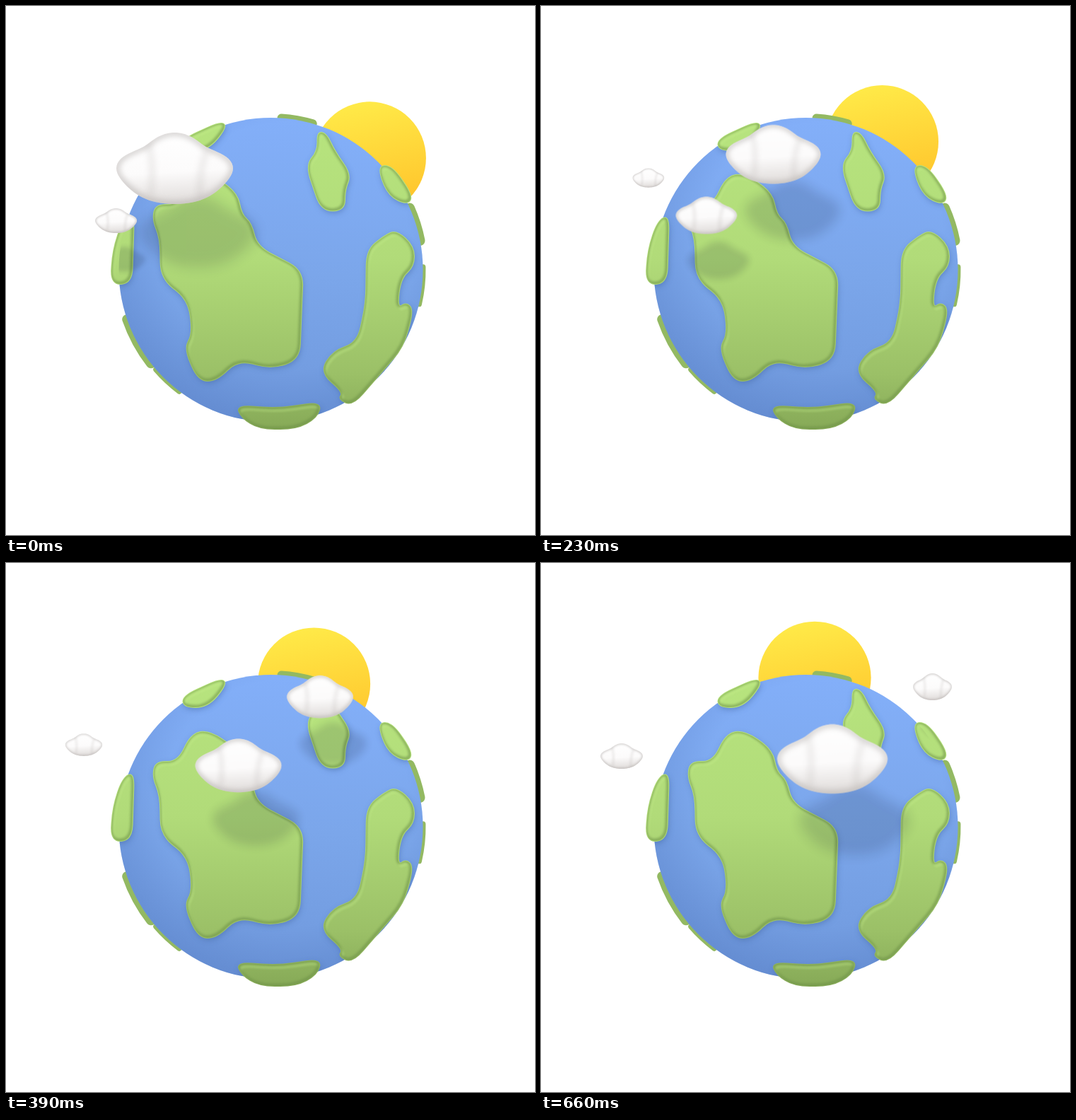
These frames come from a looping animation (748x748 px, 0.69 s). An HTML page:

```html
<!DOCTYPE html>
<html lang="en">
<head>
<meta charset="utf-8">
<title>Earth, sun and clouds</title>
<style>
  html, body { margin: 0; width: 100%; height: 100%; overflow: hidden; background: #fff; }
  svg { display: block; width: 100vw; height: 100vh; }
</style>
</head>
<body>
<svg viewBox="0 0 748 748">
  <defs>
    <linearGradient id="sunFill" x1=".4" y1="0" x2=".6" y2="1">
      <stop offset="0" stop-color="#ffea48"/>
      <stop offset="1" stop-color="#ffc22a"/>
    </linearGradient>
    <linearGradient id="sea" gradientUnits="userSpaceOnUse" x1="390" y1="159" x2="350" y2="587">
      <stop offset="0" stop-color="#83aff9"/>
      <stop offset=".5" stop-color="#7ba6ea"/>
      <stop offset="1" stop-color="#6f98dc"/>
    </linearGradient>
    <radialGradient id="seaEdge" gradientUnits="userSpaceOnUse" cx="395" cy="340" r="250">
      <stop offset=".7" stop-color="#4a70b8" stop-opacity="0"/>
      <stop offset="1" stop-color="#4a70b8" stop-opacity=".28"/>
    </radialGradient>
    <linearGradient id="grass" gradientUnits="userSpaceOnUse" x1="0" y1="160" x2="0" y2="600">
      <stop offset="0" stop-color="#b7e47e"/>
      <stop offset=".45" stop-color="#b1db79"/>
      <stop offset=".82" stop-color="#9bc067"/>
      <stop offset="1" stop-color="#86a957"/>
    </linearGradient>
    <linearGradient id="fluff" x1=".45" y1="0" x2=".55" y2="1">
      <stop offset="0" stop-color="#fff"/>
      <stop offset=".55" stop-color="#fcfbfb"/>
      <stop offset="1" stop-color="#dfdbd9"/>
    </linearGradient>

    <filter id="soft2" x="-20%" y="-20%" width="140%" height="140%"><feGaussianBlur stdDeviation="1.8"/></filter>
    <filter id="soft5" x="-20%" y="-20%" width="140%" height="140%"><feGaussianBlur stdDeviation="4.5"/></filter>
    <filter id="soft9" x="-30%" y="-40%" width="160%" height="180%"><feGaussianBlur stdDeviation="9"/></filter>

    <path id="land"/>
    <path id="puff"/>
    <circle id="globe" cx="374.5" cy="373" r="215"/>
    <clipPath id="inLand"><use href="#land"/></clipPath>
    <clipPath id="inPuff"><use href="#puff"/></clipPath>
    <clipPath id="inGlobe"><use href="#globe"/></clipPath>

    <g id="cloud">
      <use href="#puff" fill="url(#fluff)"/>
      <g clip-path="url(#inPuff)" fill="none" stroke="#aaa5a3">
        <use href="#puff" stroke-width="8" opacity=".55" filter="url(#soft5)"/>
        <path d="M-38-36Q-28-8-34 38M46-26Q34 2 36 42" stroke-width="9" opacity=".18" filter="url(#soft5)"/>
      </g>
    </g>
  </defs>

  <use id="cloudC" href="#cloud"/>
  <circle id="sun" r="79.6" fill="url(#sunFill)"/>

  <g id="rims" fill="none" stroke="#93b962" stroke-linecap="round"></g>
  <use href="#globe" fill="url(#sea)"/>
  <use href="#globe" fill="url(#seaEdge)"/>
  <g clip-path="url(#inGlobe)">
    <use href="#land" x="1" y="3" fill="#41639f" opacity=".5" filter="url(#soft5)"/>
  </g>
  <use href="#land" fill="url(#grass)" stroke="url(#grass)" stroke-width="2"/>
  <g clip-path="url(#inLand)" fill="none">
    <use href="#land" x="2" y="4" stroke="#c6ee8d" stroke-width="4" opacity=".35" filter="url(#soft2)"/>
    <use href="#land" x="-1" y="-1" stroke="#6d9146" stroke-width="5" opacity=".55" filter="url(#soft2)"/>
  </g>

  <g clip-path="url(#inGlobe)" fill="#0c1626" opacity=".14">
    <use id="shadeA" href="#puff" filter="url(#soft9)"/>
    <use id="shadeB" href="#puff" filter="url(#soft9)"/>
  </g>
  <use id="cloudA" href="#cloud"/>
  <use id="cloudB" href="#cloud"/>
</svg>
<script>
  const LOOP = 690, STEPS = 21;
  const CX = 374.5, CY = 373, R = 215;
  const $ = id => document.getElementById(id);
  const mix = (a, b, u) => a + (b - a) * u;

  // Closed polygon with softened corners
  function rounded(text, reach = 22) {
    const pts = text.split(' ').map(p => p.split(',').map(Number));
    const toward = (p, q) => {
      const u = Math.min(.5, reach / Math.hypot(q[0] - p[0], q[1] - p[1]));
      return [mix(p[0], q[0], u), mix(p[1], q[1], u)];
    };
    return pts.map((p, i) => {
      const before = pts.at(i - 1), after = pts[(i + 1) % pts.length];
      return `${i ? 'L' : 'M'}${toward(p, before)}Q${p} ${toward(p, after)}`;
    }).join('') + 'Z';
  }

  // Ellipse with four lobes, notched deeper above than below
  function puff() {
    const pts = Array.from({ length: 90 }, (_, i) => {
      const a = i / 45 * Math.PI;
      const r = 1 - (.11 - .113 * Math.sin(a)) * (1 - Math.cos(4 * a)) / 2;
      return [82.5 * r * Math.cos(a), 50.5 * r * Math.sin(a)].map(v => v.toFixed(1));
    });
    return `M${pts.join('L')}Z`;
  }

  // Far-side land seen edge-on: start angle, sweep, height above the sea
  function rim(start, sweep, height) {
    return `<circle r="${R}" pathLength="360" stroke-width="${2 * height}"
      stroke-dasharray="${sweep} 360" transform="translate(${CX} ${CY}) rotate(${start})"/>`;
  }

  $('land').setAttribute('d', [
    '262,241 288,237 327,264 333,295 347,307 355,340 420,374 415,500 375,513 328,500 298,530 272,530 252,484 264,464 258,416 219,385 218,328 207,302 212,280 243,282',
    '552,317 577,340 577,368 558,385 553,428 566,419 576,430 562,482 490,565 470,556 477,546 444,518 462,488 497,476 509,420 510,345 535,325',
    '440,178 453,180 465,206 488,238 479,260 479,289 446,290 424,225 441,205',
    '250,188 305,163 312,172 285,204 251,204',
    '525,226 546,226 575,268 568,281 540,268',
    '165,304 181,296 178,392 148,394 151,345',
    '326,565 385,569 446,560 440,582 410,598 358,598 333,582'
  ].map(p => rounded(p)).join(''));
  $('puff').setAttribute('d', puff());
  $('rims').innerHTML = rim(-86, 12, 6) + rim(-24, 13, 7) + rim(-1, 14, 4)
    + rim(142, 19, 7) + rim(127, 12, 4);

  // Each cloud drifts between two boxes [x, y, width, height], bowed sideways
  const clouds = {
    A: { from: [238.5, 229.5, 165, 101], to: [553.5, 175, 55, 38], bow: [6, -22] },
    B: { from: [155.5, 303.5, 59, 35], to: [412, 277, 156, 98], bow: [30, 0] },
    C: { from: [216, 234, 39, 24], to: [114, 273, 60, 36], bow: [-175, -10] }
  };

  function place(id, x, y, w, h) {
    $(id).setAttribute('transform', `translate(${x} ${y}) scale(${w / 165} ${h / 101})`);
  }

  function draw(n) {
    const u = n / (STEPS - 1), e = u * u * (3 - 2 * u);

    // The sun circles the globe's centre
    const a = mix(41.5, 3.4, e) * Math.PI / 180;
    $('sun').setAttribute('cx', CX + 211 * Math.sin(a));
    $('sun').setAttribute('cy', CY - 211 * Math.cos(a));

    for (const [name, { from, to, bow }] of Object.entries(clouds)) {
      const [x, y, w, h] = from.map((v, i) => mix(v, to[i], e) + (bow[i] || 0) * e * (1 - e));
      place('cloud' + name, x, y, w, h);
      if (name !== 'C') place('shade' + name, x + w * .2, y + 35 + w * .33, w, h);
    }
  }

  const startOf = n => 10 * Math.floor(n * 3.32);
  let shown = -1;
  function tick() {
    const t = performance.now() % LOOP;
    let n = STEPS - 1;
    while (startOf(n) > t) n--;
    if (n !== shown) draw(shown = n);
    requestAnimationFrame(tick);
  }
  tick();
</script>
</body>
</html>
```
